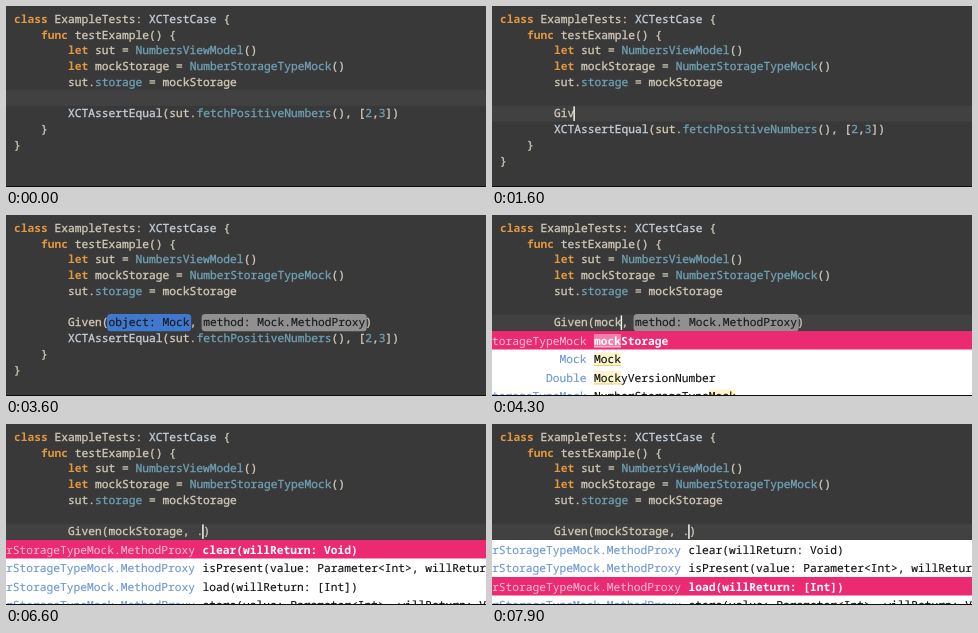
Recreate the animation shown at these times as an HTML page. Size 480 px wide and 181 px high, loop 8000 ms.

```html
<!DOCTYPE html>
<html lang="en">
<head>
<meta charset="utf-8">
<title>Code completion</title>
<style>
  html, body { margin: 0; width: 100%; height: 100%; overflow: hidden; background: #393939; }
  svg { display: block; width: 480px; height: 181px; }
  text {
    font: 11.25px "Noto Sans Mono", "DejaVu Sans Mono", monospace;
    white-space: pre; text-rendering: geometricPrecision;
    color: #d2c9b8; fill: currentColor; stroke: currentColor; stroke-width: .32px;
  }
  .key { color: #e2983f; font-weight: bold; stroke: none; }
  .type { color: #70a0b2; }
  .base { color: #c4d0da; }
  .token { color: #191a1c; stroke-width: .15px; }
  .kind { color: #6f97d3; text-anchor: end; stroke-width: .15px; }
  .item { color: #111; stroke-width: .15px; }
  .picked { color: #fff; font-weight: bold; stroke: none; }
  .kind.picked { color: #f9c3d8; font-weight: normal; }
</style>
</head>
<body>
<svg viewBox="0 0 480 181">
  <rect width="480" height="181" fill="#393939"/>
  <g id="code"></g>
  <rect id="caret" width="1.4" height="14.5" fill="#fff"/>
  <g id="popup"></g>
  <rect y="180" width="480" height="1" fill="#0c0c0c"/>
</svg>
<script>
const LOOP = 8000, CHAR = 6.755, LINE = 15.75, ITEM = 18.5, LEFT = 8, INDENT = 8;
const code = document.getElementById('code');
const popup = document.getElementById('popup');
const caret = document.getElementById('caret');

// Each line: indent, then [text, class] runs
const head = [
  [0, ['class', 'key'], [' ExampleTests: ', ''], ['XCTestCase', 'base'], [' {', '']],
  [4, ['func', 'key'], [' testExample() {', '']],
  [8, ['let', 'key'], [' sut = ', ''], ['NumbersViewModel', 'type'], ['()', '']],
  [8, ['let', 'key'], [' mockStorage = ', ''], ['NumberStorageTypeMock', 'type'], ['()', '']],
  [8, ['sut.', ''], ['storage', 'type'], [' = mockStorage', '']],
  [8]
];
const tail = [
  [8, ['XCTAssertEqual', 'base'], ['(sut.', ''], ['fetchPositiveNumbers', 'type'], ['(), [', ''],
    ['2', 'type'], [',', ''], ['3', 'type'], ['])', '']],
  [4, ['}', '']],
  [0, ['}', '']]
];

// Each item: kind, label, matched spans [start, length]
const proxy = 'NumberStorageTypeMock.MethodProxy';
const lists = {
  given: { col: 0, items: [
    ['Void', 'Given(object: Mock, method: Mock.MethodProxy)', [0, 3]],
    ['String', 'NSPersonNameComponentGivenName', [21, 3]],
    ['Int32', 'GL_INT_VEC2', [0, 1], [3, 1], [7, 1]],
    ['Int32', 'GL_INT_VEC3', [0, 1], [3, 1], [7, 1]]
  ] },
  mock: { col: 6, items: [
    ['NumberStorageTypeMock', 'mockStorage', [0, 4]],
    ['Mock', 'Mock', [0, 4]],
    ['Double', 'MockyVersionNumber', [0, 4]],
    ['NumberStorageTypeMock', 'NumberStorageTypeMock', [17, 4]]
  ] },
  method: { col: 20, items: [
    [proxy, 'clear(willReturn: Void)'],
    [proxy, 'isPresent(value: Parameter<Int>, willReturn: Bool)'],
    [proxy, 'load(willReturn: [Int])'],
    [proxy, 'store(value: Parameter<Int>, willReturn: Void)']
  ] }
};

const METHOD = 'method: Mock.MethodProxy', BLUE = '#3f78cd', GREY = '#909090';
const plain = s => [[s, '']];
const call = (arg, ...rest) => [['Given(' + arg + ', ', ''], ...rest, [')', '']];
const typing = s => call(s, [METHOD, 'token', GREY]);
const chosen = [['Given(', ''], ['object: Mock', 'token', BLUE], [', ', ''],
  [METHOD, 'token', GREY], [')', '']];
const dotted = call('mockStorage', ['.', '']);

// time, typed runs (null: line not there yet), caret column (-1: selection), list, picked item, matched length
const scenes = [
  [0, null, 0],
  [900, [], 0],
  [1200, plain('G'), 1],
  [1300, plain('Gi'), 2],
  [1600, plain('Giv'), 3],
  [1800, plain('Giv'), 3, 'given', 0, 3],
  [2500, chosen, -1],
  [3800, typing('m'), 7],
  [3900, typing('mo'), 8],
  [4000, typing('moc'), 9],
  [4100, typing('mock'), 10],
  [4200, typing('mock'), 10, 'mock', 0, 4],
  [4600, typing('mockS'), 11, 'mock', 0, 5],
  [4700, typing('mockSt'), 12, 'mock', 0, 6],
  [4800, typing('mockSto'), 13, 'mock', 0, 7],
  [5100, call('mockStorage', [METHOD, 'token', BLUE]), -1],
  [6600, dotted, 20, 'method', 0],
  [7300, dotted, 20, 'method', 1],
  [7700, dotted, 20, 'method', 2]
];

// time, caret opacity
const blink = [
  [0, 0], [100, .5], [200, 1], [500, .7], [600, .3], [700, 0], [900, 1],
  [2100, .6], [2200, .3], [2300, 0], [3800, 1], [5100, 0],
  [6600, 1], [7000, .6], [7100, 0], [7500, .5], [7600, 1]
];

const at = (table, t) => table.findLast(row => row[0] <= t);
const lineTop = i => 5.3 + i * LINE;
const colX = col => LEFT + col * CHAR;

function add(parent, tag, attrs, text) {
  const el = document.createElementNS('http://www.w3.org/2000/svg', tag);
  for (const k in attrs) el.setAttribute(k, attrs[k]);
  if (text) el.textContent = text;
  parent.append(el);
}

const rect = (parent, x, y, width, height, fill, rx = 0) =>
  add(parent, 'rect', { x, y, width, height, fill, rx });

function drawLine([indent, ...runs], i) {
  let col = indent;
  for (const [text, cls, fill] of runs) {
    const x = colX(col);
    if (fill) rect(code, x - 1.5, lineTop(i) - .8, text.length * CHAR + 3, LINE + 1.6, fill, 3.5);
    add(code, 'text', { x, y: 16.8 + i * LINE, class: cls }, text);
    col += text.length;
  }
}

function drawList(name, picked, matched) {
  const { col, items } = lists[name];
  const x = colX(INDENT + col) - .6;
  rect(popup, 0, 116, 480, 65, '#fff');
  items.forEach(([kind, label, ...spans], i) => {
    const y = 116 + i * ITEM, on = i === picked, cls = on ? ' picked' : '';
    if (on) rect(popup, 0, y, 480, ITEM, '#ec2a72');
    for (const [start, len] of spans) {
      const sx = x + start * CHAR, w = (on ? matched : len) * CHAR;
      rect(popup, sx, y + 3, w, 13, on ? '#f47fab' : '#fcf4cb');
      rect(popup, sx, y + 15.5, w, 1, on ? '#fbd0e0' : '#ead37a');
    }
    add(popup, 'text', { x: x - 7.5, y: y + 13.9, class: 'kind' + cls }, kind);
    add(popup, 'text', { x, y: y + 13.9, class: 'item' + cls }, label);
  });
}

function draw([, typed, col, list, picked, matched]) {
  code.replaceChildren();
  popup.replaceChildren();
  const row = typed ? 6 : 5;
  if (col >= 0) rect(code, 0, lineTop(row), 480, LINE, '#414141');
  const lines = typed ? [...head, [INDENT, ...typed], ...tail] : [...head, ...tail];
  lines.forEach(drawLine);
  caret.setAttribute('x', colX(INDENT + col) - .9);
  caret.setAttribute('y', lineTop(row) + .6);
  if (list) drawList(list, picked, matched);
}

let shown;
const start = performance.now();
function tick() {
  const t = (performance.now() - start) % LOOP;
  const scene = at(scenes, t);
  if (scene !== shown) draw(shown = scene);
  caret.setAttribute('opacity', at(blink, t)[1]);
  requestAnimationFrame(tick);
}
tick();
</script>
</body>
</html>
```
